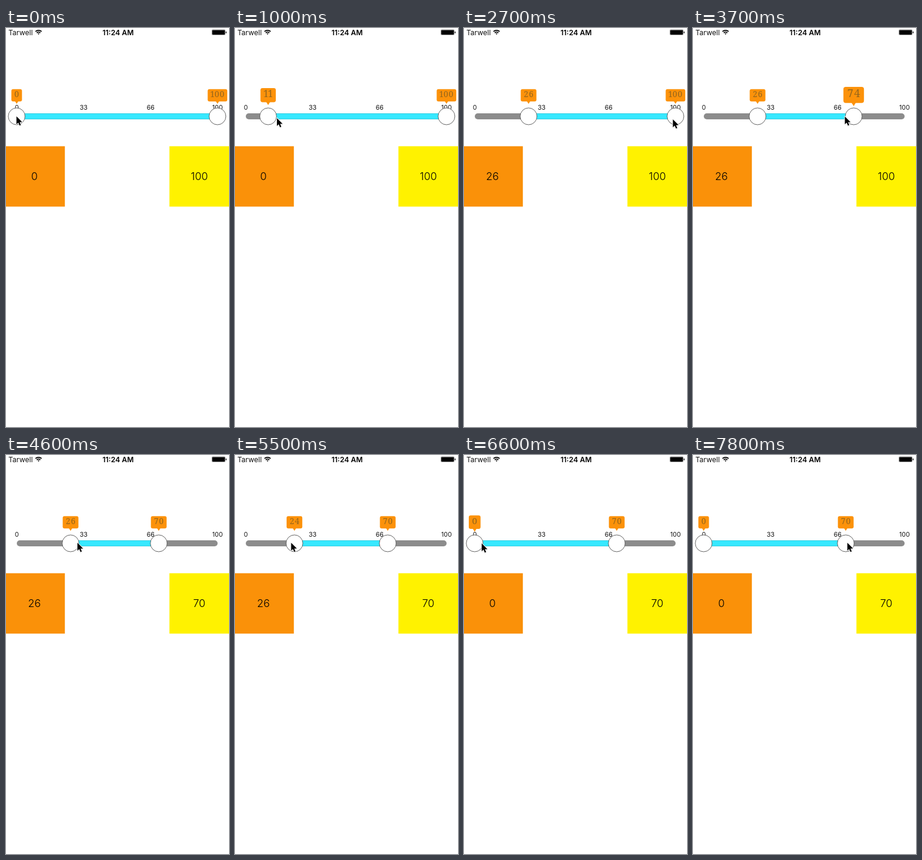
Recreate the animation shown at these times as an HTML page with a canvas. Size 372 px wide and 664 px high, loop 8000 ms.

```html
<!DOCTYPE html>
<html lang="en">
<head>
<meta charset="utf-8">
<title>Range slider</title>
<style>
  html, body { margin: 0; width: 100%; height: 100%; overflow: hidden; background: #fff; }
  canvas { display: block; width: 372px; height: 664px; }
</style>
</head>
<body>
<canvas id="stage"></canvas>
<script>
const W = 372, H = 664, LOOP = 8000, STEP = 100;
const SANS = 'Inter, Roboto, sans-serif', SLAB = '"Noto Serif", serif';
const ORANGE = '#fa9109', BUBBLE = '#fc920a', YELLOW = '#fff200', CYAN = '#37e8ff', GRAY = '#8c8c8c';
const MIN_X = 17.8, MAX_X = 352.8, MID_Y = 147;
const LEAD = 100;    // the thumb trails the pointer by this time
const COMMIT = 100;  // release delay after a drag stops

const canvas = document.getElementById('stage');
const ctx = canvas.getContext('2d');
const dpr = window.devicePixelRatio || 1;
canvas.width = W * dpr;
canvas.height = H * dpr;

const low = { home: MIN_X, drags: [
  { start: 600, end: 1500, to: 107.7 },
  { start: 5300, end: 6350, to: MIN_X }
] };
const high = { home: MAX_X, drags: [{ start: 3100, end: 3880, to: 254.8 }] };

// The pointer leads each drag, then travels to the next thumb
const pointer = { home: 17, homeY: 147, moves: [
  lead(low.drags[0], 107, 152),
  { start: 1700, end: 2400, to: 348, toY: 152 },
  lead(high.drags[0], 250, 147),
  { start: 4300, end: 4650, to: 111, toY: 146 },
  lead(low.drags[1], 21, 146),
  { start: 6500, end: 7400, to: 257, toY: 146, sag: 10 }
] };

function lead(drag, to, toY) {
  return { start: drag.start - LEAD, end: drag.end - LEAD, to, toY };
}

function smooth(u) {
  u = Math.max(0, Math.min(1, u));
  return u * u * (3 - 2 * u);
}

const progress = (m, t) => smooth((t - m.start) / (m.end - m.start));

function thumbX(side, t) {
  return side.drags.reduce((x, d) => x + (d.to - x) * progress(d, t), side.home);
}

function pointerAt(t) {
  let x = pointer.home, y = pointer.homeY;
  for (const m of pointer.moves) {
    const p = progress(m, t);
    x += (m.to - x) * p;
    y += (m.toY - y) * p + (m.sag || 0) * Math.sin(Math.PI * p);
  }
  return [x, y];
}

function popScale(side, t) {
  return side.drags.reduce((s, d) => s + 0.31 *
    (smooth((t - d.start - 200) / 400) - smooth((t - d.end - COMMIT) / 250)), 1);
}

const valueAt = x => String(Math.floor((x - MIN_X) / (MAX_X - MIN_X) * 100 + 0.001));

function committed(side, t) {
  return valueAt(side.drags.reduce((x, d) => t >= d.end + COMMIT ? d.to : x, side.home));
}

function text(str, x, y, font, color = '#000', align = 'center') {
  ctx.font = font;
  ctx.fillStyle = color;
  ctx.textAlign = align;
  ctx.fillText(str, x, y);
}

function box(x, y, w, h, r, color) {
  ctx.fillStyle = color;
  ctx.beginPath();
  ctx.roundRect(x, y, w, h, r);
  ctx.fill();
}

function poly(points, color) {
  ctx.fillStyle = color;
  ctx.beginPath();
  points.forEach(([x, y]) => ctx.lineTo(x, y));
  ctx.closePath();
  ctx.fill();
}

function statusBar() {
  text('Tarwell', 4, 11.5, '12px ' + SANS, '#111', 'left');
  text('11:24 AM', 187, 11.5, '600 12px ' + SANS);
  ctx.strokeStyle = '#000';
  ctx.lineWidth = 1.7;
  for (const r of [1.2, 4.2, 7.2]) {
    ctx.beginPath();
    ctx.arc(54.3, 11, r, -Math.PI * 0.75, -Math.PI * 0.25);
    ctx.stroke();
  }
  ctx.strokeStyle = '#555';
  ctx.lineWidth = 0.5;
  ctx.beginPath();
  ctx.roundRect(343.4, 2.8, 22.4, 8.8, 1.6);
  ctx.stroke();
  box(344.1, 3.5, 21, 7.4, 0.8, '#000');
  box(366.5, 5.8, 1.3, 3, 0.6, '#000');
}

function track(lo, hi) {
  box(18, 142, 335, 10, 5, GRAY);
  ctx.fillStyle = CYAN;
  ctx.fillRect(lo, 142, hi - lo, 10);
  ctx.strokeStyle = '#35cfe2';
  ctx.lineWidth = 1;
  ctx.strokeRect(lo, 142.5, hi - lo, 9);
}

function thumb(x) {
  ctx.beginPath();
  ctx.arc(x, MID_Y, 14, 0, Math.PI * 2);
  ctx.fillStyle = '#fff';
  ctx.fill();
  ctx.strokeStyle = '#555';
  ctx.lineWidth = 0.9;
  ctx.stroke();
}

function bubble(x, scale) {
  const chars = [...valueAt(x)];
  const advance = c => c === '1' ? 6.5 : 8.5;
  const inner = chars.reduce((sum, c) => sum + advance(c), 0);
  const w = inner + 9.2;
  ctx.save();
  ctx.translate(x, 114);
  ctx.scale(scale, scale);
  box(-w / 2, -12.2, w, 20.4, 3, BUBBLE);
  poly([[-3, 7.5], [3, 7.5], [0, 12.3]], BUBBLE);
  let pen = -inner / 2;
  for (const c of chars) {
    text(c, pen + advance(c) / 2, 0.9, '300 13.5px ' + SLAB, '#93651c');
    pen += advance(c);
  }
  ctx.restore();
}

function square(x, w, color, label, labelX) {
  box(x, 196.7, w, 100.5, 0, color);
  text(label, labelX, 253, '350 17.5px ' + SANS);
}

function cursor(x, y) {
  const arrow = [[0.5, 0], [0.5, 14], [3.7, 11.1], [6, 16.3], [8.3, 15.3], [6.1, 10.3], [10.6, 10.2]];
  ctx.save();
  ctx.translate(x, y);
  ctx.scale(0.94, 0.94);
  ctx.shadowColor = 'rgba(0,0,0,.3)';
  ctx.shadowBlur = 2 * dpr;
  ctx.shadowOffsetY = dpr;
  poly(arrow, '#000');
  ctx.shadowColor = 'transparent';
  ctx.strokeStyle = '#fff';
  ctx.lineWidth = 1.8;
  ctx.lineJoin = 'round';
  ctx.stroke();
  poly(arrow, '#000');
  ctx.restore();
}

function draw(t) {
  const lo = thumbX(low, t), hi = thumbX(high, t);
  ctx.setTransform(dpr, 0, 0, dpr, 0, 0);
  ctx.fillStyle = '#fff';
  ctx.fillRect(0, 0, W, H);
  statusBar();

  [0, 33, 66, 100].forEach((n, i) => text(n, 18 + i * 111.6, 136, '10.5px ' + SANS, '#111'));
  track(lo, hi);
  thumb(lo);
  thumb(hi);
  bubble(lo, popScale(low, t));
  bubble(hi, popScale(high, t));

  square(0, 98.2, ORANGE, committed(low, t), 47.5);
  square(272.6, 99.4, YELLOW, committed(high, t), 322.5);
  cursor(...pointerAt(t));
}

const start = performance.now();
function tick() {
  const t = (performance.now() - start) % LOOP;
  draw(Math.floor(t / STEP) * STEP);
  requestAnimationFrame(tick);
}
tick();
</script>
</body>
</html>
```
